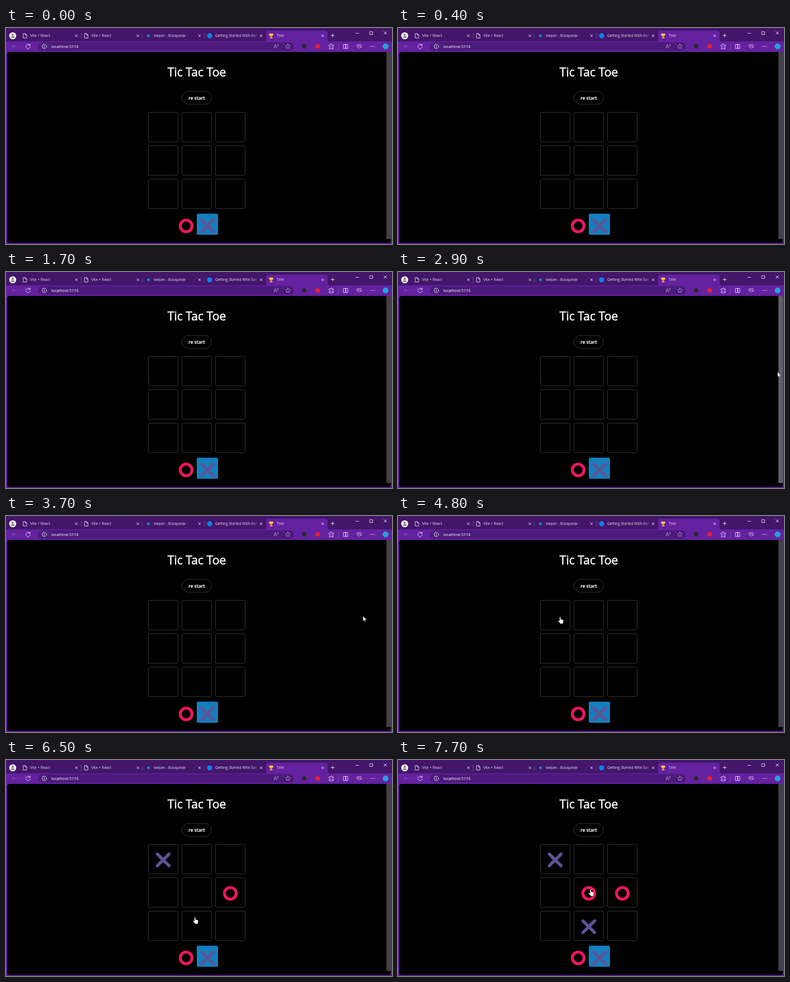
Recreate the animation shown at these times as an HTML page. Size 690 px wide and 388 px high, loop 8 s.

```html
<!DOCTYPE html>
<html lang="en">
<head>
<meta charset="utf-8">
<title>Tic Tac Toe</title>
<style>
  html, body { margin: 0; width: 100%; height: 100%; overflow: hidden; background: #000; }
  svg { display: block; width: 690px; height: 388px; }
  text { font-family: "Open Sans", "Noto Sans", sans-serif; fill: #fff; }
  .tab { font-size: 6.6px; fill: #e6dcee; }
  .title { font-size: 21.1px; stroke: #fff; stroke-width: .5; text-anchor: middle; }
  .line { fill: none; stroke: #e9def2; stroke-width: .9; stroke-linecap: round; stroke-linejoin: round; }
  .cell { fill: none; stroke: #333; }
  .x { fill: none; stroke: #5f5397; stroke-width: 5.4; stroke-linecap: round; }
  .o { fill: none; stroke: #ee175f; stroke-width: 5.2; }
</style>
</head>
<body>
<svg viewBox="0 0 690 388">
  <defs>
    <path id="X" class="x" d="M-10.5-10.5 10.5 10.5M10.5-10.5-10.5 10.5"/>
    <circle id="O" class="o" r="10.5"/>
    <path id="close" class="line" d="M-2-2 2 2M2-2-2 2"/>
    <path id="doc" class="line" d="M-2.8-4H.6L3-1.6V4H-2.8ZM.6-4V-1.6H3"/>
    <linearGradient id="fade">
      <stop offset=".85" stop-color="#43166a" stop-opacity="0"/>
      <stop offset="1" stop-color="#43166a"/>
    </linearGradient>
  </defs>

  <rect width="690" height="388" fill="#43166a"/>
  <path d="M0 24H461Q465 24 465 20V9Q465 5 469 5H571Q575 5 575 9V20Q575 24 579 24H690V388H0Z" fill="#6421a0"/>
  <rect x="57" y="25.5" width="458" height="15" rx="7.5" fill="#4c1a7b"/>
  <path d="M2 388V47Q2 43 6 43H684Q688 43 688 47V383Q688 386 685 386H5Q2 386 2 383Z" fill="#000"/>
  <path d="M0 386H690V388H0Z" fill="#551b88"/>
  <path id="thumb" d="M680 43H684Q688 43 688 47V379H680Z"/>

  <g id="tabs">
    <circle cx="12" cy="14" r="6.3" fill="#f4f1f6"/>
    <circle cx="12" cy="12.3" r="2" fill="#77717c"/>
    <path d="M8.3 17.6Q8.3 15 12 15T15.7 17.6Z" fill="#77717c"/>
    <use href="#doc" x="34" y="14"/>
    <use href="#doc" x="143.5" y="14"/>
    <circle cx="254.5" cy="14" r="2.6" fill="#147fd0"/>
    <circle cx="364" cy="14" r="4.6" fill="#0d80ee"/>
    <path d="M471.5 10H476.5V12.5Q476 15 474.6 15.2V17H476.3V18.3H471.7V17H473.4V15.2Q472 15 471.5 12.5ZM471.5 11H469.8Q470 13.5 472 13.7M476.5 11H478.2Q478 13.5 476 13.7" fill="#f3bf35" stroke="#f3bf35" stroke-width=".4"/>
    <path d="M134.5 9V19M243.5 9V19M354.5 9V19" stroke="#765090" stroke-width=".8"/>
    <path class="line" d="M580.8 13.5H587.2M584 10.3V16.7M625.5 9.5H630.5M650.5 6.7H655.5V11.7H650.5ZM675.5 6.5 680.5 11.5M680.5 6.5 675.5 11.5"/>
  </g>

  <g class="line">
    <path d="M19 33H11.5M14.5 29.8 11.3 33 14.5 36.2" stroke="#8d62b2"/>
    <path d="M43 31A4 4 0 1 0 43.5 34M43.3 28.7V31.3H40.6"/>
    <circle cx="68.5" cy="33" r="4"/>
    <path d="M68.5 32.7V35M68.5 30.9V31"/>
    <path d="M504 28.7 505.3 31.5 508.3 31.8 506 33.9 506.7 37 504 35.4 501.3 37 502 33.9 499.7 31.8 502.7 31.5Z" stroke="#a98cc2"/>
    <path d="M478.5 36.2 481.3 29.5 484.1 36.2M479.5 34H483.2M484.5 29.5Q486 30.5 485 32M486.3 28.8Q488 30.5 486.5 32.3" stroke="#a98cc2"/>
    <path d="M578 30.5H580Q580 28.5 581.4 28.5T582.8 30.5H585V32.6Q583 32.4 583 34T585 35.4V37.3H578V35Q579.8 35 579.8 33.7T578 32.4Z"/>
    <path d="M594.5 28V38" stroke="#8753b4"/>
    <path d="M603.5 29.5H607.3V36.8H603.5ZM607.3 29.5H611V36.8H607.3Z"/>
    <path d="M631 37 627.5 33.3Q626.5 30 629 29.6 630.4 29.5 631 31 632 29.4 633.6 29.7 636 30.5 634.5 33.3M630 33H632L633 34.5H635.5"/>
    <path d="M652.2 33H652.3M655.2 33H655.3M658.2 33H658.3" stroke-width="1.4"/>
  </g>
  <circle cx="533" cy="33" r="4" fill="#262a2b"/>
  <circle cx="557" cy="33" r="4.4" fill="#d9203c"/>
  <circle cx="678.5" cy="33" r="5.2" fill="#22a2dc"/>
  <text x="81" y="35.6" font-size="7.2">localhost:5174</text>

  <text class="title" x="341" y="87">Tic Tac Toe</text>
  <rect class="cell" x="314.5" y="114" width="53" height="23" rx="11.5"/>
  <text x="341" y="128.8" font-size="8" font-weight="700" text-anchor="middle">re start</text>

  <g id="board"></g>
  <rect id="turn" y="333.5" width="38" height="38" rx="3" fill="#147fbd"/>
  <use href="#O" x="322" y="355.5"/>
  <use href="#X" x="360" y="355.5"/>

  <g id="cursor" fill="#fff" stroke="#111" stroke-width=".5">
    <path id="arrow" d="M0 0V9.2L2.1 7.3 3.5 10.4 5 9.7 3.6 6.7H6.5Z"/>
    <path id="hand" d="M-1.2.8Q-1.2-.2-.2-.2T.9.8V4L5 5Q6 5.4 5.8 6.6L5 10.2V12H-.4V10.8L-3.8 7.2Q-4 5.8-2.7 6L-1.2 7.2Z"/>
  </g>
</svg>

<script>
const LOOP = 8000, STEP = 100;
const $ = id => document.getElementById(id);

function add(parent, tag, attrs, text = '') {
  const el = document.createElementNS('http://www.w3.org/2000/svg', tag);
  for (const name in attrs) el.setAttribute(name, attrs[name]);
  el.textContent = text;
  return parent.appendChild(el);
}

const tabs = [
  [43, 'Vite + React'], [152.5, 'Vite + React'], [264, 'swiper - Búsqueda'],
  [374, 'Getting Started With Swi'], [484, 'Title']
];
tabs.forEach(([x, label], i) => {
  add($('tabs'), 'text', { x, y: 16.3, class: 'tab' }, label);
  if (label.length > 20) add($('tabs'), 'rect', { x, y: 6, width: 77, height: 17, fill: 'url(#fade)' });
  add($('tabs'), 'use', { href: '#close', x: 125.7 + 110.1 * i, y: 14 });
});

const cellLeft = i => 254 + i % 3 * 60;
const cellTop = i => 151 + Math.floor(i / 3) * 60;
for (let i = 0; i < 9; i++)
  add($('board'), 'rect', { x: cellLeft(i) + .5, y: cellTop(i) + .5, width: 53, height: 53, rx: 2, class: 'cell' });

// Each move: time, cell; X begins and the players alternate.
const moves = [[5000, 0], [5700, 5], [6800, 7], [7600, 4]].map(([time, cell], i) => ({
  time,
  mark: add($('board'), 'use', { href: i % 2 ? '#O' : '#X', x: cellLeft(cell) + 27, y: cellTop(cell) + 28.5 })
}));

// Pointer tip: time, x, y
const path = [
  [2700, 689, 190], [2900, 678.5, 179.5], [3500, 678.5, 179.5], [4500, 290, 181.5],
  [5100, 290, 181.5], [5200, 296, 180.5], [5300, 296, 180.5], [5500, 421, 224],
  [5600, 421, 224], [5800, 405, 234], [5900, 405, 234], [6500, 338, 282.5],
  [7000, 338, 282.5], [7300, 342, 216], [7400, 342, 216], [7500, 344.5, 232.5],
  [LOOP, 344.5, 232.5]
];

function pointerAt(t) {
  const i = Math.max(1, path.findIndex(p => p[0] >= t));
  const [t0, x0, y0] = path[i - 1], [t1, x1, y1] = path[i];
  const u = (t - t0) / (t1 - t0), k = u * u * (3 - 2 * u);
  return [x0 + (x1 - x0) * k, y0 + (y1 - y0) * k];
}

const overCell = (x, y) => {
  const dx = x - 254, dy = y - 151;
  return dx >= 0 && dy >= 0 && dx < 174 && dy < 174 && dx % 60 < 54 && dy % 60 < 54;
};

const show = (el, on) => el.setAttribute('visibility', on ? 'visible' : 'hidden');

function draw(now) {
  const t = Math.floor(now % LOOP / STEP) * STEP;
  let played = 0;
  for (const { time, mark } of moves) {
    show(mark, t >= time);
    if (t >= time) played++;
  }
  $('turn').setAttribute('x', played % 2 ? 303 : 341);

  const [x, y] = pointerAt(t), visible = t >= 2800, hand = overCell(x, y);
  $('cursor').setAttribute('transform', `translate(${x} ${y})`);
  show($('arrow'), visible && !hand);
  show($('hand'), visible && hand);
  $('thumb').setAttribute('fill', visible && x > 677 ? '#606060' : '#424242');
}

const start = performance.now();
function tick() {
  draw(performance.now() - start);
  requestAnimationFrame(tick);
}
tick();
</script>
</body>
</html>
```
